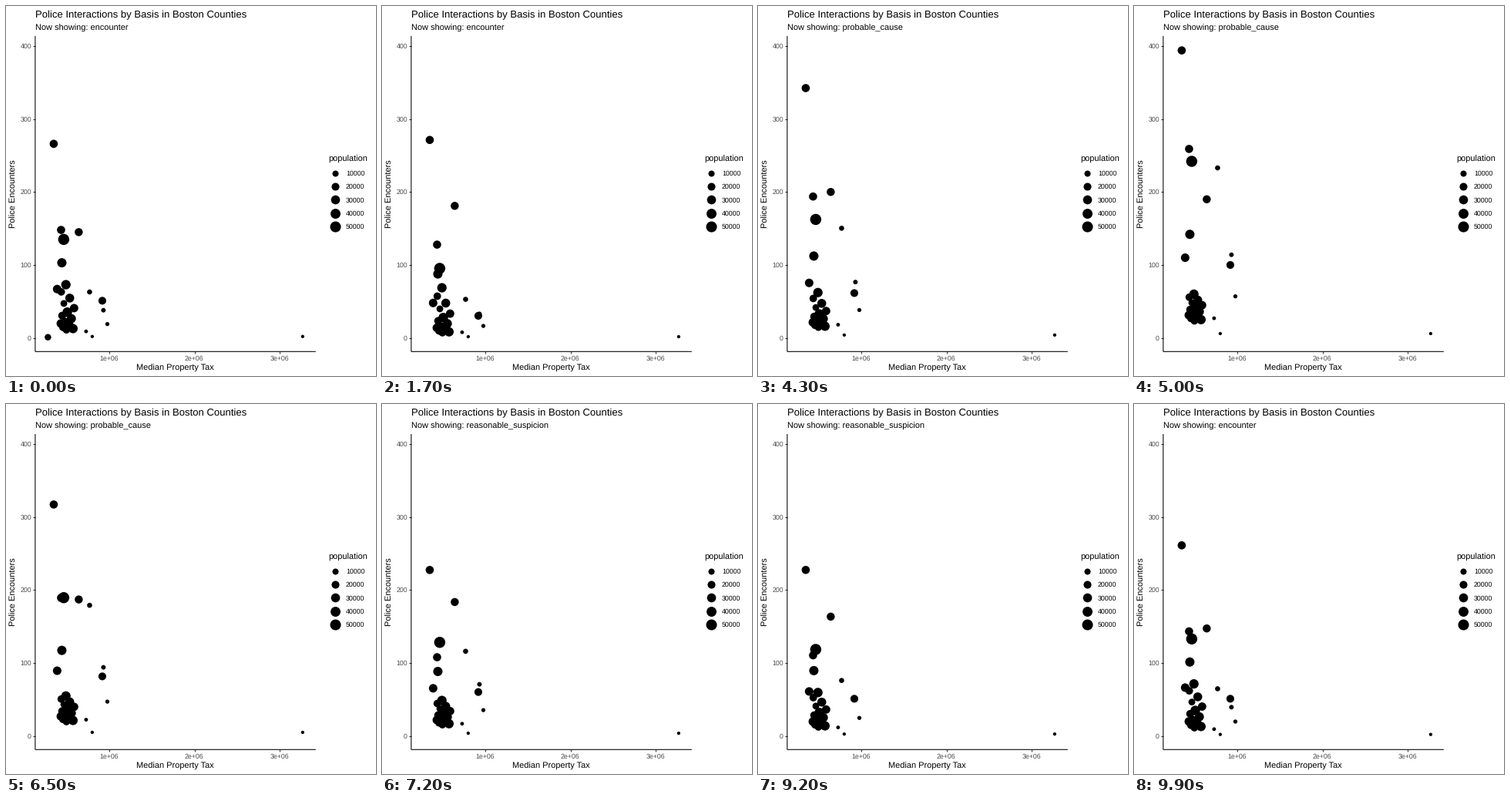
A matplotlib script that plays this animation: 480x480 px, repeating every 10 s.

```python
import numpy as np
import matplotlib.pyplot as plt
from matplotlib.animation import FuncAnimation

plt.rcParams.update({"font.family": "Liberation Sans", "text.hinting": "none"})

SIZE, DPI = 480, 72
FRAMES, INTERVAL = 100, 100
GREY = "#4d4d4d"
NONE = np.nan
STATES = ["encounter", "intel", "probable_cause", "reasonable_suspicion"]
STATE_FRAMES = FRAMES // len(STATES)

# Standout areas: median tax, population (both in thousands), count per state
LANDMARKS = [
    (350, 23, 266, 276, 394, 189),
    (436, 23, 148, 110, 259, 73),
    (467, 54, 135, 60, 242, 102),
    (643, 22, 145, 213, 190, 182),
    (445, 33, 103, 74, 142, 76),
    (390, 26, 67, 31, 110, 55),
    (770, 5.2, 63, 44, 233, 89),
    (919, 20, 51, 12, 100, 51),
    (282, 11.5, 1, NONE, NONE, NONE),
]


def suburb(tax, base):
    """Small, expensive area whose counts keep a fixed ratio."""
    ratio = np.array([1, 0.75, 3, 1.6])
    return (tax, 1.5 + base / 18, *(base * ratio))


def inner_area(rank):
    """Mid-priced area; counts fall off geometrically with rank."""
    spread = (0.5 + 0.618 * rank) % 1
    tax = 430 + 165 * spread ** 1.4
    population = 12 + 28 * ((0.8 + 1.414 * rank) % 1)
    peak = np.array([73, 65, 60, 46])
    decay = np.array([0.865, 0.8, 0.93, 0.91])
    return (tax, population, *(peak * decay ** rank))


suburbs = [suburb(tax, base) for tax, base in
           [(932, 38), (978, 19), (729, 9), (801, 2), (3266, 2)]]
areas = np.array(LANDMARKS + suburbs + [inner_area(k) for k in range(14)])
tax, population, counts = areas[:, 0], areas[:, 1], areas[:, 2:].T


def marker_area(population):
    """Area scale from 1 to 6 mm, as a squared diameter in points."""
    share = (np.asarray(population) - 1.5) / (54 - 1.5)
    radius = 1.067 * (1 + 5 * np.sqrt(share)) + 0.825
    return (2 * radius) ** 2


def label(x, y, text, size=11, color="black", **kwargs):
    """Place text by its baseline, in pixels from the top left."""
    return fig.text(x / SIZE, 1 - y / SIZE, text, fontsize=size, color=color,
                    va="baseline", **kwargs)


fig = plt.figure(figsize=(SIZE / DPI, SIZE / DPI), dpi=DPI, facecolor="white")

left, right, top, bottom = 37.9, 401.8, 39, 448.3
ax = fig.add_axes([left / SIZE, 1 - bottom / SIZE,
                   (right - left) / SIZE, (bottom - top) / SIZE])
ax.set_xlim(133, 3419)
ax.set_ylim(-18.65, 413.65)
ax.spines[["top", "right"]].set_visible(False)
for side in ("left", "bottom"):
    ax.spines[side].set(linewidth=1.07, capstyle="butt", snap=False)
ax.set_xticks([1000, 2000, 3000])
ax.set_yticks(range(0, 401, 100))
ax.tick_params(length=2.75, width=1.07, color="#333333",
               labelbottom=False, labelleft=False)

for millions in (1, 2, 3):
    label(133.5 + 110.6 * (millions - 1), 460, f"{millions}e+06", 8.8, GREY,
          ha="center")
for count in range(0, 401, 100):
    label(33, 433.8 - 0.947 * count, str(count), 8.8, GREY, ha="right")

label(38, 15, "Police Interactions by Basis in Boston Counties", 13.15)
subtitle = label(38, 32, "")
label(219.6, 473, "Median Property Tax", ha="center")
label(13, 244, "Police Encounters", rotation=90, rotation_mode="anchor",
      ha="center")

label(418, 202, "population")
overlay = fig.add_axes([0, 0, 1, 1], facecolor="none")
overlay.set(xlim=(0, SIZE), ylim=(SIZE, 0))
overlay.axis("off")
for i in range(5):
    y = 216.7 + 17.28 * i
    overlay.scatter(426.7, y, s=marker_area(10 * (i + 1)), c="black",
                    linewidths=0)
    label(441, y + 3.4, f"{i + 1}0000", 8.8)

points = ax.scatter(tax, counts[0], s=marker_area(population), c="black",
                    linewidths=0, zorder=3)


def update(frame):
    state, step = divmod(frame, STATE_FRAMES)
    following = (state + 1) % len(STATES)
    last_still = 8 if state == 0 else 9
    progress = max(0, step - last_still) / (STATE_FRAMES - last_still)

    # Areas missing from either state only show while the state holds still
    y = counts[state]
    if progress > 0:
        y = y + (counts[following] - y) * progress
    points.set_offsets(np.column_stack([tax, y]))

    closest = following if step >= 18 else state
    subtitle.set_text(f"Now showing: {STATES[closest]}")
    return points, subtitle


anim = FuncAnimation(fig, update, frames=FRAMES, interval=INTERVAL,
                     repeat=True, repeat_delay=0)
plt.show()
```
